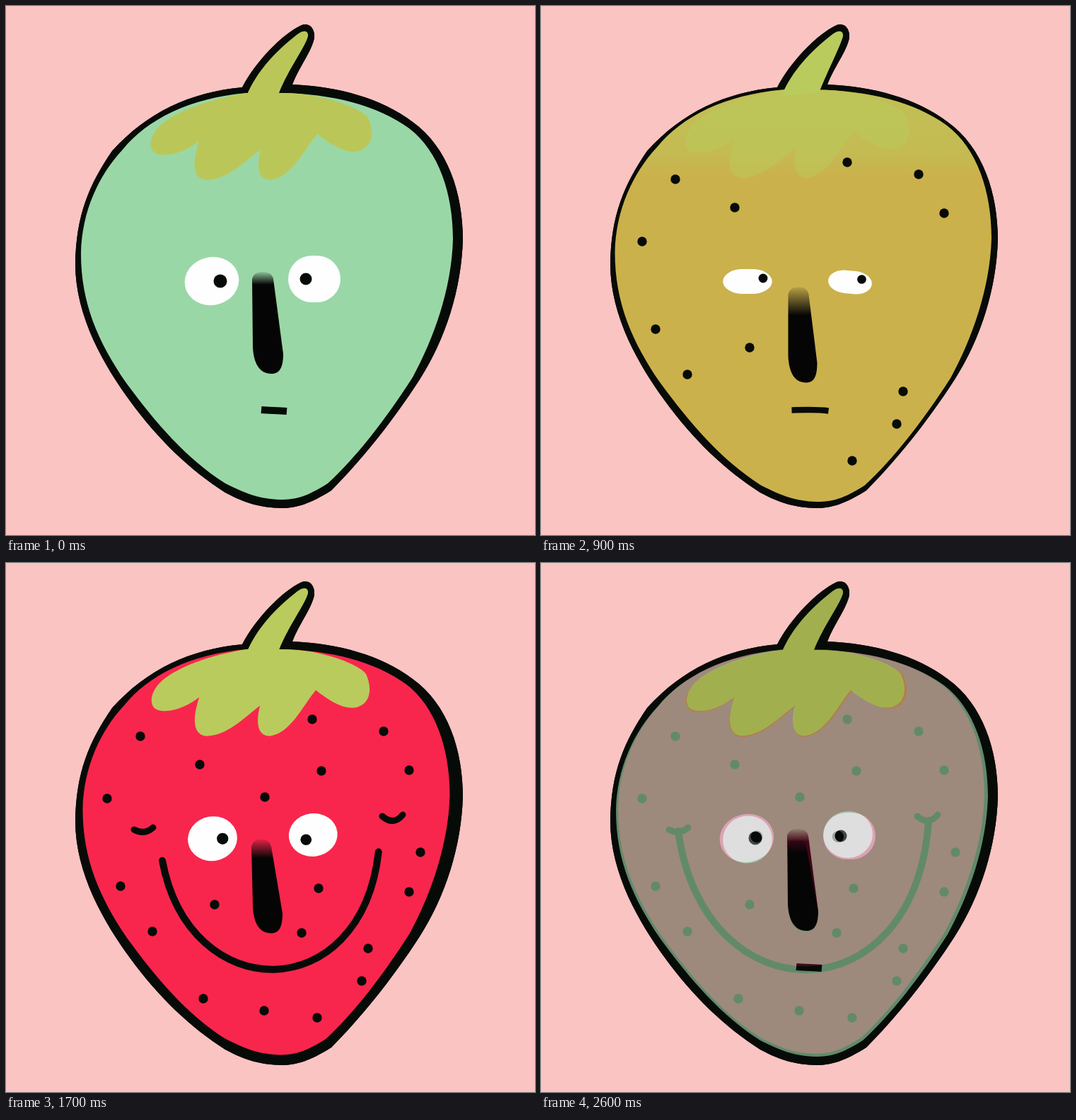
An HTML page with a canvas that plays this animation: 748x748 px, repeating every 2700 ms.

```html
<!DOCTYPE html>
<html lang="en">
<head>
<meta charset="utf-8">
<title>Ripening strawberry</title>
<style>
  html, body { margin: 0; width: 100%; height: 100%; overflow: hidden; background: #fac4c2; }
  canvas { display: block; }
</style>
</head>
<body>
<canvas id="stage" width="748" height="748"></canvas>
<script>
const SIZE = 748, LOOP = 2700, STEP = 100, FADE_START = 2435;
const INK = '#070b08';
const stage = document.getElementById('stage').getContext('2d');
const layer = document.createElement('canvas');
layer.width = layer.height = SIZE;
const face = layer.getContext('2d');

const silhouette = new Path2D(`M334 115 C352 80 390 40 418 27 C430 23 437 33 436 45
  C432 65 415 85 405 111 C470 114 530 130 575 164 C625 200 646 265 646 330
  C644 400 622 470 585 528 C545 590 500 645 460 685 C430 704 410 710 390 710
  C360 709 340 704 310 688 C260 656 215 613 175 558 C140 510 98 440 98 365
  C99 295 118 252 150 205 C200 150 260 122 334 115Z`);
const flesh = new Path2D(`M340 123 H388 C460 124 525 140 570 173 C612 205 632 265 632 330
  C630 400 605 470 575 525 C535 587 495 638 455 675 C425 694 410 698 388 698
  C358 697 340 690 310 675 C255 640 212 590 170 533 C130 475 106 420 106 350
  C107 290 132 238 165 203 C200 160 260 130 340 123Z`);
const leaf = new Path2D(`M340 123 C290 131 240 148 217 170 C203 183 198 207 217 210
  C238 213 258 202 273 191 C264 218 262 244 283 246 C312 246 335 222 360 203
  C354 226 356 246 374 246 C404 242 420 205 440 181 C458 195 476 207 494 206
  C518 203 522 180 512 158 C500 142 440 122 386 122Z`);

// box: left, right, top, bottom of the flesh
// eye: x, y, rx, ry, roundness, tilt; pupil: x, y, r
// nose: top x, y, half width, bottom x, y, half width, soft length
// mouth: four Bezier points, line width
const poses = [
  { at: 0, body: [154, 215, 166], leaf: [186, 199, 88], leafAlpha: 1, dimple: 0, stem: 386,
    box: [106, 632, 123, 698],
    eyes: [[291, 389, 38.5, 34, 1, -.2], [436, 386, 37, 33, .9, 0]],
    pupils: [[303, 389, 9.5], [424, 386, 8.5]],
    nose: [363, 376, 15, 371, 520, 21, 18],
    mouth: [361, 571, 373, 572, 385, 572, 397, 573, 10] },
  { at: 400, body: [184, 213, 95], leaf: [183, 204, 91], leafAlpha: 0, dimple: 0, stem: 395,
    box: [105, 632, 120, 697],
    eyes: [[292, 389, 35.5, 18, .6, -.04], [434, 385, 34, 17.5, .9, .03]],
    pupils: [[315, 399, 7], [452, 395, 6.5]],
    nose: [367, 400, 11, 372, 521, 21, 14],
    mouth: [362, 573, 378, 569, 394, 570, 406, 576, 11] },
  { at: 700, body: [188, 198, 78], leaf: [184, 203, 93], leafAlpha: 0, dimple: 0, stem: 392,
    box: [105, 636, 119, 700],
    eyes: [[291, 391, 36, 19, 1, 0], [436, 389, 33, 16, .9, .08]],
    pupils: [[312, 378, 6.2], [447, 379, 6]],
    nose: [367, 394, 13, 371, 531, 21, 42],
    mouth: [357, 570, 372, 568, 388, 569, 404, 576, 8] },
  { at: 1100, body: [217, 156, 74], leaf: [185, 203, 93], leafAlpha: 1, dimple: 0, stem: 394,
    box: [104, 638, 118, 702],
    eyes: [[293, 388, 33.5, 16, .6, 0], [438, 392, 29, 16.5, .65, .12]],
    pupils: [[316, 392, 6.7], [460, 394, 6.7]],
    nose: [361, 401, 16, 370, 534, 19, 38],
    mouth: [352, 573, 370, 574, 390, 571, 409, 569, 9] },
  { at: 1400, body: [255, 120, 72], leaf: [185, 203, 93], leafAlpha: 1, dimple: 0, stem: 386,
    box: [107, 629, 122, 700],
    eyes: [[292, 386, 35, 25, 1, -.1], [435, 386, 33, 23, 1, -.2]],
    pupils: [[310, 398, 7], [437, 404, 6.8]],
    nose: [358, 393, 17, 369, 531, 19, 46],
    mouth: [302, 546, 348, 582, 418, 584, 463, 542, 10] },
  { at: 1800, body: [245, 10, 79], leaf: [185, 203, 93], leafAlpha: 1, dimple: 1, stem: 386,
    box: [109, 627, 122, 694],
    eyes: [[292, 391, 35, 33.5, 1, -.2], [434, 384, 35, 33, 1, -.1]],
    pupils: [[305, 387, 8.5], [420, 387, 8.2]],
    nose: [362, 390, 13, 371, 521, 21, 20],
    mouth: [194, 379, 230, 643, 530, 643, 548, 364, 10] }
];

const seedGroups = [
  [200, [190, 245], [274, 285], [143, 333]],
  [400, [512, 545], [503, 591], [440, 643]],
  [600, [433, 221], [534, 238], [570, 293]],
  [900, [162, 457], [207, 521], [295, 483]],
  [1100, [586, 409], [570, 465]],
  [1300, [442, 460], [418, 523]],
  [1400, [279, 616], [365, 633]],
  [1700, [446, 294], [366, 331]]
];

function mix(a, b, k) {
  if (typeof a === 'number') return a + (b - a) * k;
  if (Array.isArray(a)) return a.map((v, i) => mix(v, b[i], k));
  return Object.fromEntries(Object.keys(a).map(key => [key, mix(a[key], b[key], k)]));
}

function poseAt(t) {
  const next = poses.findIndex(p => p.at > t);
  if (next < 0) return poses[poses.length - 1];
  const a = poses[next - 1], b = poses[next];
  return mix(a, b, (t - a.at) / (b.at - a.at));
}

const rgba = (c, alpha = 1) => `rgba(${c.map(Math.round)},${alpha})`;

function dot(x, y, r) {
  face.beginPath();
  face.arc(x, y, r, 0, 7);
  face.fill();
}

function drawFlesh(p) {
  const [left, right, top, bottom] = p.box;
  const sx = (right - left) / 526, sy = (bottom - top) / 575;
  face.save();
  face.transform(sx, 0, 0, sy, left - 106 * sx, top - 123 * sy);
  face.clip(flesh);
  face.fillStyle = rgba(p.body);
  face.fillRect(0, 0, SIZE, SIZE);
  // While fruit and leaf share a colour, only a soft cap remains.
  const cap = face.createLinearGradient(0, 150, 0, 245);
  cap.addColorStop(0, rgba(p.leaf, 1 - p.leafAlpha));
  cap.addColorStop(.6, rgba(p.leaf, .8 * (1 - p.leafAlpha)));
  cap.addColorStop(1, rgba(p.leaf, 0));
  face.fillStyle = cap;
  face.fillRect(0, 0, SIZE, 245);
  face.fillStyle = rgba(p.leaf, p.leafAlpha);
  face.fill(leaf);
  face.restore();

  face.fillStyle = rgba(p.leaf);
  face.beginPath();
  face.moveTo(340, 127);
  face.bezierCurveTo(355, 92, 380, 65, 412, 40);
  face.bezierCurveTo(420, 34, 428, 34, 427, 43);
  face.bezierCurveTo(422, 60, p.stem + 14, 88, p.stem, 123);
  face.fill();
}

function drawEye([x, y, rx, ry, round, tilt]) {
  face.save();
  face.translate(x, y);
  face.rotate(tilt);
  face.fillStyle = '#fefefe';
  face.beginPath();
  face.roundRect(-rx, -ry, 2 * rx, 2 * ry, { x: rx * round, y: ry * Math.min(1, round * 1.3) });
  face.fill();
  face.restore();
}

function drawNose([tx, ty, tw, bx, by, bw, soft]) {
  const shade = face.createLinearGradient(0, ty, 0, ty + soft);
  shade.addColorStop(0, 'rgba(5,5,5,.1)');
  shade.addColorStop(1, 'rgb(5,5,5)');
  face.fillStyle = shade;
  face.beginPath();
  face.moveTo(tx - tw, ty + 10);
  face.quadraticCurveTo(tx - tw + 2, ty, tx, ty);
  face.quadraticCurveTo(tx + tw - 2, ty, tx + tw, ty + 10);
  face.lineTo(bx + bw, by - 28);
  face.bezierCurveTo(bx + bw, by - 6, bx + 14, by, bx + 4, by);
  face.bezierCurveTo(bx - 12, by, bx - bw, by - 14, bx - bw - 1, by - 38);
  face.fill();
}

function drawMouth([x, y, ...rest], dimple) {
  face.strokeStyle = INK;
  face.lineWidth = rest[6];
  face.lineCap = dimple || rest[6] > 10 ? 'round' : 'butt';
  face.beginPath();
  face.moveTo(x, y);
  face.bezierCurveTo(...rest.slice(0, 6));
  face.stroke();
  if (dimple < .7) return;
  face.lineWidth = 9;
  face.beginPath();
  face.moveTo(181, 377);
  face.quadraticCurveTo(196, 385, 208, 374);
  face.moveTo(532, 358);
  face.quadraticCurveTo(548, 372, 561, 356);
  face.stroke();
}

function composeFace(t, alpha) {
  const p = poseAt(t);
  face.clearRect(0, 0, SIZE, SIZE);
  face.fillStyle = INK;
  face.fill(silhouette);
  drawFlesh(p);
  face.fillStyle = INK;
  for (const [start, ...seeds] of seedGroups)
    if (t >= start) seeds.forEach(([x, y]) => dot(x, y, 6.7));
  p.eyes.forEach(drawEye);
  face.fillStyle = INK;
  p.pupils.forEach(pupil => dot(...pupil));
  drawNose(p.nose);
  drawMouth(p.mouth, p.dimple);
  stage.globalAlpha = alpha;
  stage.drawImage(layer, 0, 0);
  stage.globalAlpha = 1;
}

function render(now) {
  const t = Math.floor(now % LOOP / STEP) * STEP;
  const fade = Math.max(0, (t - FADE_START) / (LOOP - FADE_START));
  stage.fillStyle = '#fac4c2';
  stage.fillRect(0, 0, SIZE, SIZE);
  stage.fillStyle = INK;
  stage.fill(silhouette);
  composeFace(t, 1 - .55 * fade);
  if (fade) composeFace(0, fade);
}

const begin = performance.now();
function tick() {
  render(performance.now() - begin);
  requestAnimationFrame(tick);
}
tick();
</script>
</body>
</html>
```
